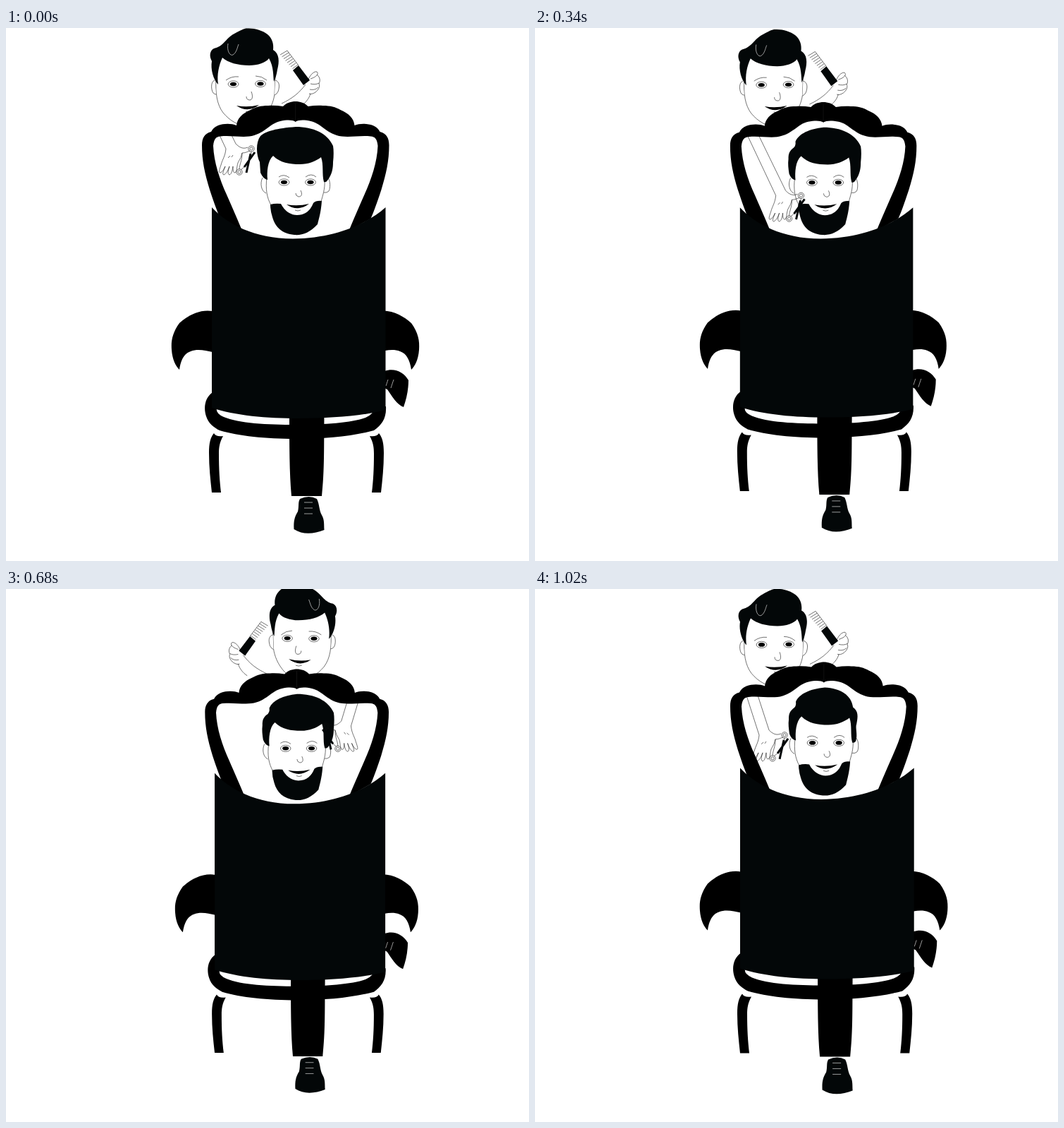
Recreate the animation shown at these times as an HTML page. Size 742 by 755 pixels, loop 1.19 s.

```html
<!DOCTYPE html>
<html lang="en">
<head>
<meta charset="utf-8">
<title>Barber at work</title>
<style>
html, body { margin: 0; width: 100%; height: 100%; overflow: hidden; background: #fff; }
svg { display: block; width: 742px; height: 755px; }
.ink { fill: #030708; }
.line { fill: none; stroke: #111; stroke-width: .6; }
.face { fill: #fff; stroke: #111; stroke-width: .6; }
.lace { fill: none; stroke: #ddd; stroke-width: .7; }
.blade { fill: none; stroke: #030708; stroke-width: 3; }
</style>
</head>
<body>
<svg viewBox="0 0 742 755">
  <defs>
    <clipPath id="inside"><rect x="270" y="146" width="290" height="160"/></clipPath>
    <g id="eye">
      <ellipse class="line" rx="7.4" ry="4.6"/>
      <ellipse rx="4.6" ry="2.8"/>
    </g>
    <path id="post" d="M411 104C404 104 398 106 393 111C386 110 379 109.500 372 110C361 110 354 112 347 116C335 121 328 128 327 138C320 135 309 135 301 138C296 140 293 143 291 147C282 149 278 156 278 166C278 188 282 206 289 229C294 244 298 256 304 270L335 287C328 270 320 252 313 236C303 214 295 190 294 167C295 157 298 154 304 153.500C318 152 333 155 345 153.500C366 151 374 135 389 132C399 130 406 130 411 133Z"/>
    <path id="rest" d="M293 401C274 398 257 408 246 418C236 432 234 443 235 456C236 470 241 479 246 484C248 470 253 461 262 458C272 454 283 457 293 459Z"/>
    <path id="leg" d="M295 574C297 578 302 579 308 578C303 587 302 594 302 603C302 625 303 641 305 658H292C290 640 288 622 288 602C288 588 290 580 295 574Z"/>
  </defs>

  <g id="scene">
    <g id="barberArm">
      <path class="line" d="M425 80C416 92 406 100 391 107M432 93C430 100 425 106 419 110"/>
      <path class="line" d="M429 73C432 65 438 61 441 62C444 65 441 69 432 72M441 66C446 70 446 75 444 79C446 83 443 88 439 91C436 93 433 94 430 93M432 79C436 80 441 80 444 78M431 87C436 88 440 87 443 84"/>
      <path class="ink" d="M407 60L415 53L431 74L422 81Z"/>
      <path class="line" id="teeth"/>
    </g>

    <g id="barberHead">
      <path class="face" d="M298 72C297 92 299 108 308 120C318 132 331 139 343 139C361 138 378 116 381 94L382 68"/>
      <path class="face" d="M296 74C290 76 291 88 294 92Q296 94 298 94M382 74C389 76 388 84 386 90Q384 94 381 95"/>
      <path class="ink" d="M301 80C294 73 290 58 292 47C288 40 289 32 295 29C309 26 311 15 324 8C333 3 338 .5 342 .5C353 0 363 3 371 9C378 15 380 23 379 31C388 36 388 48 385 59C384 66 382 72 380 76C379 68 380 55 373 43C369 49 357 53 345 53C329 53 315 49 307 42C302 53 299 66 301 80Z"/>
      <path class="lace" d="M315 22C313 33 318 40 322 38C327 35 328 28 330 23"/>
      <use href="#eye" x="322.500" y="79.500"/>
      <use href="#eye" x="361" y="79"/>
      <path class="line" d="M312 74Q320 68 330 69M354 68Q363 68 370 74M348 90C351 98 349 102 346 102Q341 102 341 97M340 118Q345 120 349 118"/>
      <path d="M327 110Q343 113 359 109Q343 121 327 110Z"/>
    </g>

    <g id="client">
      <path class="line" d="M364 212C360 220 362 231 369 234M456 211C461 216 460 228 458 231Q455 234 451 233M370 212C368 228 370 240 376 251M452 215C453 228 449 238 447 246"/>
      <path class="ink" id="hair"/>
      <path class="ink" d="M375 250Q382 248 390 249C394 257 402 265 413 265C425 265 432 258 436 248Q440 244 448 245C447 260 444 270 442 278C431 290 420 294 409 293C391 291 382 282 378 268Q375 259 375 250Z"/>
      <use href="#eye" x="394.500" y="218.500"/>
      <use href="#eye" x="432" y="218.500"/>
      <path class="line" d="M387 211Q394 206 402 212M425 211Q433 205 440 211M418 230C421 236 419 239 415 239Q411 238 411 234M410 258Q414 260 418 258"/>
      <path d="M398 250Q414 253 430 249Q414 261 398 250Z"/>
    </g>

    <g clip-path="url(#inside)">
      <g id="cutArm">
        <path class="line" id="forearm"/>
        <path class="line" d="M343 237C342 248 338 252 336 260C334 266 332 271 335 271C338 270 340 266 342 262C340 268 337 273 340 274C343 273 346 268 348 262C346 268 345 273 348 274C351 273 352 268 353 262C353 267 353 271 356 271C359 269 358 264 360 257Q365 249 366 243M346 250L349 247M351 249L353 246"/>
        <path class="line" d="M357 230C362 235 367 238 374 235M366 243C371 243 374 241 377 240M366 243C366 254 362 260 362 266"/>
        <g class="line">
          <circle cx="379" cy="237" r="4.200"/><circle cx="379" cy="237" r="2.200"/>
          <circle cx="362" cy="270" r="4.200"/><circle cx="362" cy="270" r="2.200"/>
          <path d="M379 241L378 246M364 267L370 262"/>
        </g>
        <path class="blade" d="M378 244L372 271M384 242L369 263"/>
      </g>
    </g>

    <use href="#post"/>
    <use href="#post" transform="translate(821.500 0) scale(-1 1)"/>
    <path d="M410.700 107V130" stroke="#222" stroke-width=".5"/>
    <use href="#rest"/>
    <use href="#rest" transform="translate(821 0) scale(-1 1)"/>
    <path d="M537 486C551 481 564 487 571 499C571 513 568 526 564 537C554 533 548 522 541 512L537 510Z"/>
    <path class="lace" d="M542 498L539 507M550 498L546 510"/>
    <path fill-rule="evenodd" d="M293 516C282 524 280 538 284 550C287 560 295 566 303 570C330 578 368 582 411 582C454 582 493 578 522 570C533 562 540 553 539 536ZM299 538Q297 546 309 551C330 560 371 562 411 562C451 562 491 559 510 552Q522 547 522 538Z"/>
    <use href="#leg"/>
    <use href="#leg" transform="translate(824 0) scale(-1 1)"/>
    <path d="M402 545H451.500C451 595 452 626 448 663H405C402 630 402 590 402 545Z"/>
    <path class="ink" d="M417 667Q430 661 441 667C445 675 444 683 448 690C452 697 451 703 451.500 711C436 717 421 718 408.500 710C408 699 409 693 414 685C416 677 414 672 417 667Z"/>
    <path class="lace" d="M423 672H435M423 680H435M423 688H435"/>
    <path class="ink" d="M292 254C313 277 352 298.500 407 298.500C469 298 514 276 538.500 254V541C510 549 463 553 415 553C371 553 324 549 292 538Z"/>
  </g>
</svg>
<script>
const el = id => document.getElementById(id);
const put = (id, value) => el(id).setAttribute('transform', value);
const HOLD = 170;

// view: scale x, shift x, scale y, shift y; arm: offset of the cutting hand
const poses = [
  { view: [1, 0, 1, 0], arm: [-31, -66], shaggy: true },
  { view: [1.0015, -.8, 1.0015, 0], arm: [-23, -57] },
  { view: [.996, 0, .9945, 1.6], arm: [0, 0] },
  { view: [1, 0, 1, 0], arm: [0, 0] },
  { view: [.982, 9.3, .981, 11.5], arm: [-74, -51], lean: 15, flip: true },
  { view: [1.002, -1.6, 1, -1.5], arm: [-61, -3.5], lean: 15, flip: true, trimmed: true },
  { view: [1.001, -1.3, 1, -.6], arm: [-24, -29.5], lean: 13, trimmed: true }
];

const left = shaggy => shaggy
  ? 'C384 142 369 146 361 153C354 162 355 180 360 190L361 205'
  : 'C391 142 376 149 371 160Q372 167 367 170C361 175 361 180 361 185C360 192 361 199 362 206';
const right = trimmed => trimmed
  ? 'C459 207 455 197 457 192C459 181 460 174 452 168C450 151 434 141 412 140'
  : 'C463 207 464 198 464 190C465 181 465 173 464 167C456 149 436 140 411 140';
const hairPath = p => 'M371 215C370 204 371 188 379 181C389 191 402 193 417 193C429 193 439 189 447 183' +
  'C451 194 448 207 451 218Q454 219 456 216' + right(p.trimmed) + left(p.shaggy) + 'Q365 214 371 215Z';

let teeth = 'M399 32L415 53';
for (let i = 0; i < 8; i++) {
  const x = 389 + i * 2.5, y = 38 + i * 2.8;
  teeth += `M${x} ${y}L${x + 10 - i * .4} ${y - 6 + i * .1}`;
}
el('teeth').setAttribute('d', teeth);

function show(p) {
  const [sx, tx, sy, ty] = p.view, [ax, ay] = p.arm, lean = p.lean || 0;
  const mirror = dy => p.flip ? `matrix(-1 0 0 1 758 ${dy})` : '';
  put('scene', `matrix(${sx} 0 0 ${sy} ${tx} ${ty})`);
  put('barberHead', mirror(-19.5));
  put('barberArm', mirror(3.5));
  put('cutArm', (p.flip ? 'translate(758 0) scale(-1 1) ' : '') + `translate(${ax} ${ay})`);
  el('forearm').setAttribute('d', `M${302 + lean} 150L343 237M${318 + lean} 150L357 230`);
  el('hair').setAttribute('d', hairPath(p));
}

let shown = -1;
function tick() {
  const i = Math.floor(performance.now() / HOLD) % poses.length;
  if (i !== shown) show(poses[shown = i]);
  requestAnimationFrame(tick);
}
tick();
</script>
</body>
</html>
```
